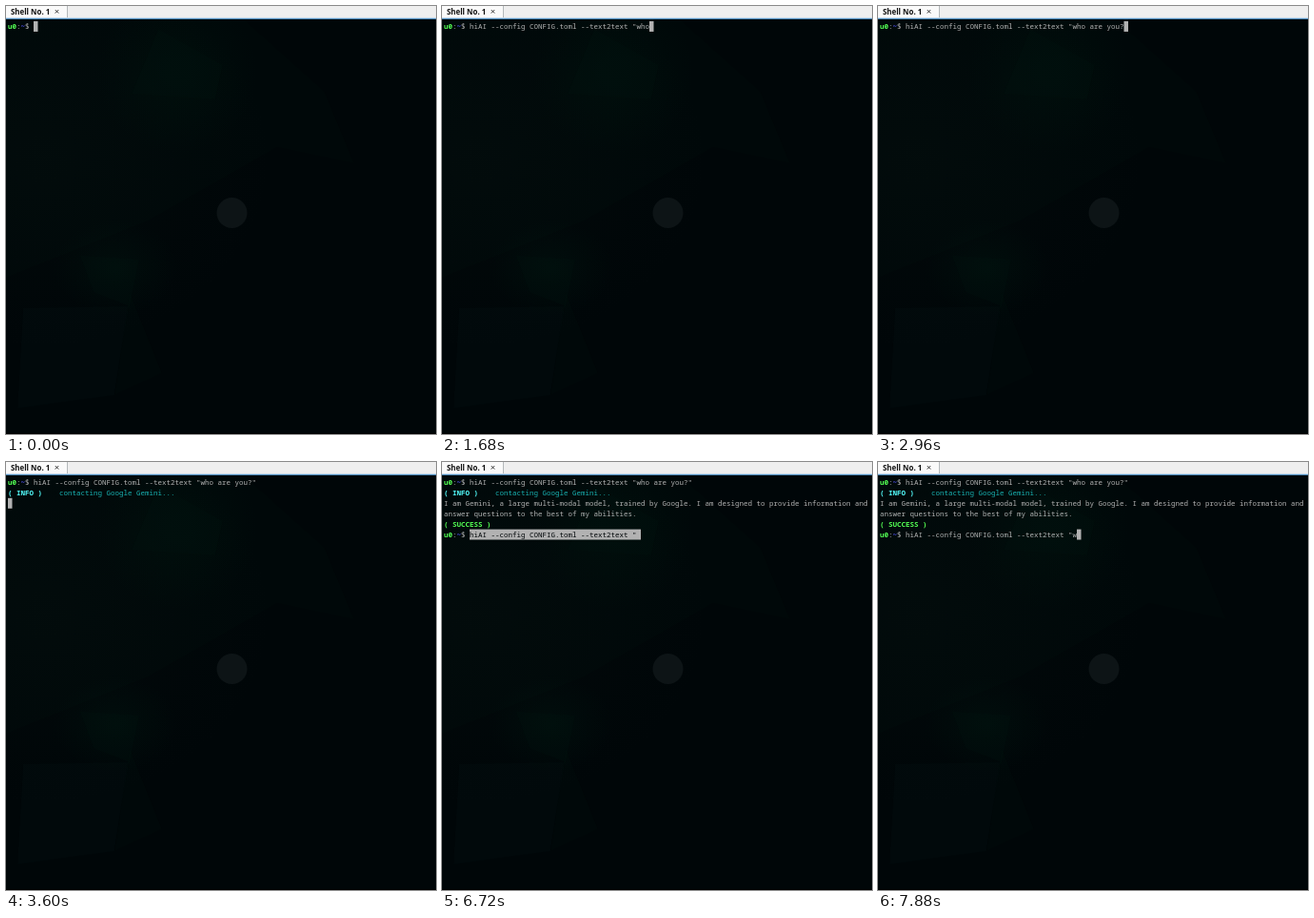
These frames come from a looping animation (452x449 px, 8000 ms). An HTML page with a canvas:

```html
<!DOCTYPE html>
<html lang="en">
<head>
<meta charset="utf-8">
<title>Terminal session</title>
<style>
  html, body { margin: 0; width: 100%; height: 100%; overflow: hidden; background: #000608; }
  canvas { display: block; width: 452px; height: 449px; }
</style>
</head>
<body>
<canvas id="stage" width="452" height="449"></canvas>
<script>
const W = 452, H = 449, LOOP = 8000;
const LEFT = 2, TOP = 16, CELL = 4.5, ROW = 10.92;
const MONO = '"Noto Sans Mono", monospace';
const SANS = '"Noto Sans", sans-serif';
const GREY = '#b2b2b2', CYAN = '#18b2b2', LIME = '#54ff54', AQUA = '#54ffff', BLUE = '#5454ff', DARK = '#000608';

const COMMAND = 'hiAI --config CONFIG.toml --text2text "';
const QUESTION = 'who are you?"';
const ANSWER = [
  'I am Gemini, a large multi-modal model, trained by Google. I am designed to provide information and',
  'answer questions to the best of my abilities.'
];

// [time, number of typed characters after the pasted command]
const FIRST = [[1680, 3], [1760, 4], [2000, 5], [2080, 6], [2240, 7], [2360, 9],
  [2440, 10], [2600, 11], [2960, 12], [3360, 13]];
const SECOND = [[7560, 0], [7880, 1]];
const PASTE_1 = 520, ENTER = 3600, REPLY = 5760, PASTE_2 = 6720;

const ctx = document.getElementById('stage').getContext('2d');
const wallpaper = document.createElement('canvas');
wallpaper.width = W;
wallpaper.height = H;

function glow(c, x, y, rx, ry, rgb, alpha) {
  c.save();
  c.translate(x, y);
  c.scale(rx, ry);
  const g = c.createRadialGradient(0, 0, 0, 0, 0, 1);
  g.addColorStop(0, `rgba(${rgb},${alpha})`);
  g.addColorStop(1, `rgba(${rgb},0)`);
  c.fillStyle = g;
  c.fillRect(-1, -1, 2, 2);
  c.restore();
}

function facet(c, color, ...points) {
  c.fillStyle = color;
  c.beginPath();
  points.forEach(([x, y]) => c.lineTo(x, y));
  c.fill();
}

function bar(c, color, x, y, w, h) {
  c.fillStyle = color;
  c.fillRect(x, y, w, h);
}

function paintWallpaper() {
  const c = wallpaper.getContext('2d');
  bar(c, DARK, 0, 0, W, H);
  glow(c, 40, 160, 240, 200, '30,50,40', 0.08);
  glow(c, 180, 70, 85, 85, '0,60,30', 0.11);
  glow(c, 115, 275, 65, 50, '0,60,35', 0.12);
  facet(c, 'rgba(15,50,45,.04)', [0, 14], [250, 14], [335, 90], [366, 165], [285, 148], [150, 225], [0, 285]);
  facet(c, 'rgba(0,60,30,.04)', [160, 24], [228, 62], [220, 98], [132, 92]);
  facet(c, 'rgba(30,60,55,.05)', [18, 317], [129, 315], [114, 408], [12, 422]);
  facet(c, 'rgba(20,50,45,.04)', [130, 300], [164, 385], [114, 408]);
  facet(c, 'rgba(0,60,40,.05)', [78, 262], [140, 266], [130, 315], [92, 300]);

  c.fillStyle = '#0d1416';
  c.beginPath();
  c.arc(237.5, 217, 16, 0, 2 * Math.PI);
  c.fill();

  bar(c, '#efefef', 0, 0, W, 12);
  bar(c, '#fafafa', 0, 0, 64, 12);
  bar(c, '#b4b8ba', 64, 0, 1, 12);
  bar(c, '#c3d9ec', 0, 12, W, 1);
  bar(c, '#4c88b8', 0, 13, W, 1);
  bar(c, '#000', 0, H - 1, W, 1);

  c.fillStyle = '#111';
  c.scale(0.5, 0.5);
  c.font = `bold 15.8px ${SANS}`;
  c.fillText('Shell No. 1', 10, 17);
  c.strokeStyle = '#222';
  c.lineWidth = 1.8;
  c.beginPath();
  c.moveTo(103.5, 8); c.lineTo(110.5, 15);
  c.moveTo(110.5, 8); c.lineTo(103.5, 15);
  c.stroke();
}

const colX = col => LEFT + col * CELL;

// Text is set at twice the size and halved, so the cells keep exact widths.
function write(text, col, row, color, bold) {
  ctx.save();
  ctx.scale(0.5, 0.5);
  ctx.font = `${bold ? 'bold ' : ''}15px ${MONO}`;
  ctx.fillStyle = color;
  ctx.fillText(text, 2 * colX(col), 2 * (TOP + row * ROW + 8.4));
  ctx.restore();
}

function block(col, row, cells = 1) {
  bar(ctx, GREY, colX(col), TOP + row * ROW, cells * CELL, ROW);
}

function prompt(row) {
  write('u0', 0, row, LIME, true);
  write(':', 2, row, GREY);
  write('~', 3, row, BLUE, true);
  write('$', 4, row, GREY);
}

function commandLine(t, row, pasteAt, typing, cursor) {
  prompt(row);
  if (t < pasteAt) return block(6, row);
  if (t < typing[0][0]) {
    block(6, row, COMMAND.length + 1);
    return write(COMMAND, 6, row, DARK);
  }
  const count = typing.filter(step => step[0] <= t).pop()[1];
  const line = COMMAND + QUESTION.slice(0, count);
  write(line, 6, row, GREY);
  if (cursor) block(6 + line.length, row);
}

function draw(t) {
  ctx.drawImage(wallpaper, 0, 0);
  commandLine(t, 0, PASTE_1, FIRST, t < ENTER);
  if (t < ENTER) return;
  write('( INFO )', 0, 1, AQUA, true);
  write('contacting Google Gemini...', 12, 1, CYAN);
  if (t < REPLY) return block(0, 2);
  ANSWER.forEach((line, i) => write(line, 0, 2 + i, GREY));
  write('( SUCCESS )', 0, 4, LIME, true);
  commandLine(t, 5, PASTE_2, SECOND, true);
}

const start = performance.now();
function tick() {
  draw((performance.now() - start) % LOOP);
  requestAnimationFrame(tick);
}

paintWallpaper();
tick();
</script>
</body>
</html>
```
